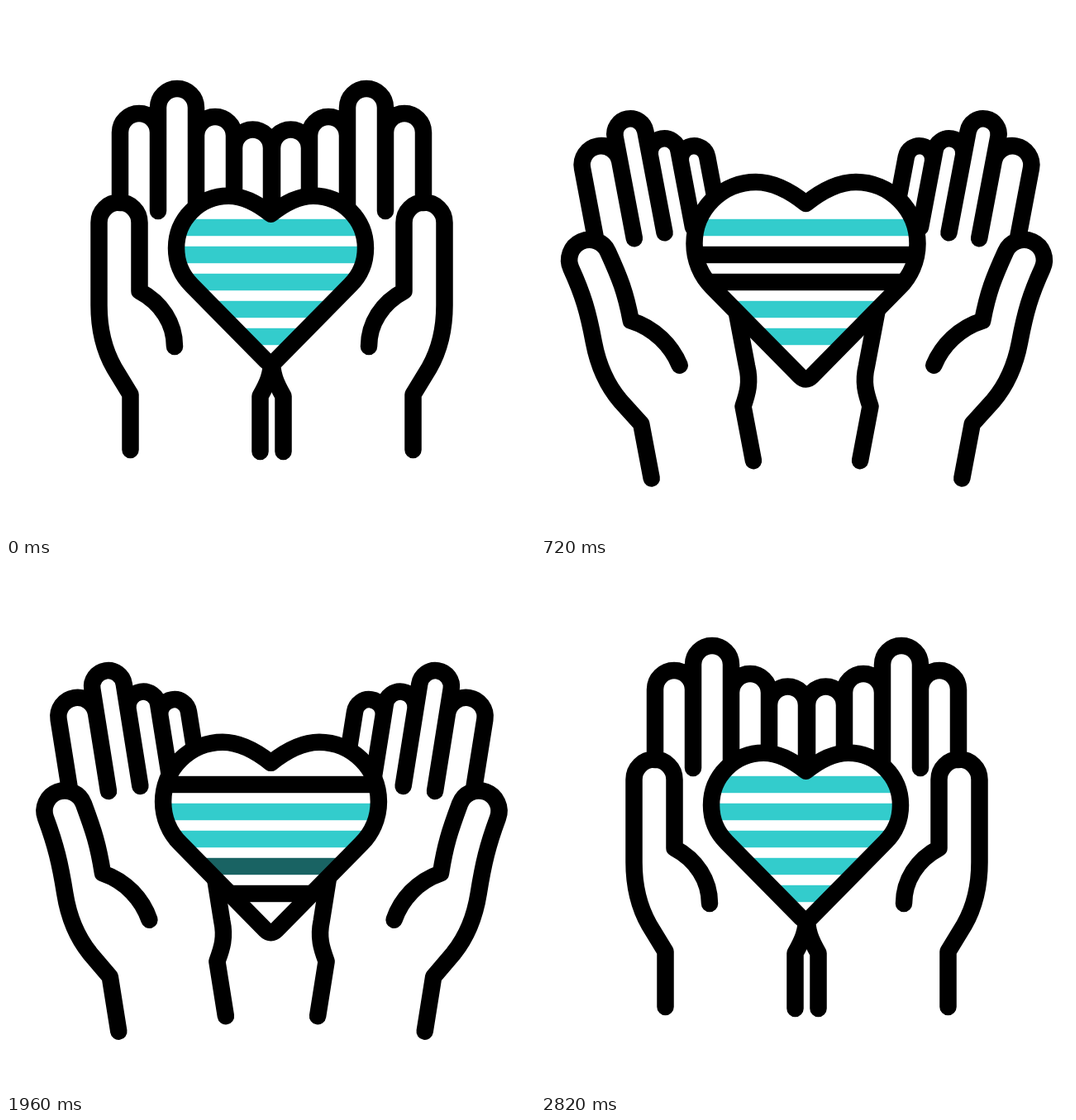
An HTML page with a canvas for the animation above (3600 ms loop, 640 px wide and 640 px high).

```html
<!DOCTYPE html>
<html lang="en">
<head>
<meta charset="utf-8">
<title>Hands and heart</title>
<style>
html, body { margin: 0; width: 100%; height: 100%; overflow: hidden; background: #fff; }
canvas { display: block; width: 640px; height: 640px; }
</style>
</head>
<body>
<canvas id="stage" width="640" height="640"></canvas>
<script>
const LOOP = 3600;
const ctx = document.getElementById('stage').getContext('2d');

// Smooth curve through [time, value] keys, without overshoot, at rest at both ends.
function curve(keys) {
  const step = i => (keys[i + 1][1] - keys[i][1]) / (keys[i + 1][0] - keys[i][0]);
  const slopes = keys.map((_, i) => {
    if (i === 0 || i === keys.length - 1) return 0;
    const a = step(i - 1), b = step(i);
    return a * b > 0 ? 2 * a * b / (a + b) : 0;
  });
  return t => {
    const last = keys.length - 1;
    if (t >= keys[last][0]) return keys[last][1];
    let i = 0;
    while (t >= keys[i + 1][0]) i++;
    const [t0, v0] = keys[i], [t1, v1] = keys[i + 1];
    const d = t1 - t0, u = (t - t0) / d, w = 1 - u;
    return v0 * (1 + 2 * u) * w * w + v1 * u * u * (3 - 2 * u)
      + d * u * w * (slopes[i] * w - slopes[i + 1] * u);
  };
}

const swing = curve([[0, 0], [220, .5], [440, .79], [540, .85], [1020, 1], [1250, 1.01], [1480, .99],
  [1620, .95], [1960, .78], [2160, .62], [2440, .33], [2700, .07], [2820, 0]]);
const fold = curve([[0, 0], [440, .43], [1020, 1], [1250, 1.01], [1480, .98], [1960, .63], [2440, .2], [2820, 0]]);
const beat = curve([[0, 0], [420, 1], [1050, 1], [1580, 0], [1600, 0], [2120, 1], [2380, 1], [2820, 0]]);

// Middle of the fade to black and back, per stripe from the top.
const stripes = [[1150, 2200], [250, 1720], [110, 1250], [1960, 2600], [1350, 2660]];
const FADE = 80;

const mix = (a, b, k) => a + (b - a) * k;
const ramp = (t, mid) => Math.min(1, Math.max(0, (t - mid) / FADE + .5));

function finger(x0, x1, y, bottom0, bottom1) {
  const r = (x1 - x0) / 2;
  ctx.moveTo(x0, bottom0);
  ctx.lineTo(x0, y);
  ctx.arc(x0 + r, y, r, Math.PI, 0);
  ctx.lineTo(x1, bottom1);
}

function thumb(m) {
  const cx = mix(137, 122.5, m), cy = mix(262, 264, m), r = 24.5, tilt = m * Math.PI / 10;
  const sin = Math.sin(tilt), cos = Math.cos(tilt);
  const lx = cx - r * cos, ly = cy + r * sin, rx = cx + r * cos, ry = cy - r * sin;
  ctx.moveTo(150.5, 537);
  ctx.lineTo(150.5, 470);
  ctx.lineTo(131, 438);
  ctx.bezierCurveTo(119, 417, 112.5, 390, 112.5, 362);
  ctx.bezierCurveTo(112.5, 325, lx + 35 * sin, ly + 35 * cos, lx, ly);
  ctx.arc(cx, cy, r, Math.PI - tilt, -tilt);
  ctx.bezierCurveTo(rx + 35 * sin, ry + 35 * cos, 161.5, 310, 161.5, 345);
  ctx.bezierCurveTo(188, 359, 204, 384, mix(204, 211, m), mix(412, 408, m));
}

function hand(a, m) {
  const x2 = 184 + mix(46, 34.7, m);
  const x3 = x2 + mix(46, 31.8, m);
  const x4 = x3 + mix(45, 29, m);
  ctx.save();
  ctx.translate(mix(184, 107, a), mix(248, 284, a));
  ctx.rotate(-11.6 * a * Math.PI / 180);
  ctx.translate(-184, -248);
  ctx.beginPath();
  thumb(m);
  finger(138, 184, 153, 238, 248);
  finger(184, x2, 123, 248, 248);
  finger(x2, x3, mix(157, 152, m), 248, 248);
  finger(x3, x4, mix(172, 166, m), 248, 425);
  ctx.bezierCurveTo(x4 + 1, 445, x4 - 5, 457, x4 - 13.5, 472);
  ctx.lineTo(x4 - 13.5, 539);
  ctx.stroke();
  ctx.restore();
}

function heartPath(scale) {
  const r = 74.5, lobe = 60.5, k = Math.PI / 4;
  ctx.save();
  ctx.translate(320.5, 323.6);
  ctx.scale(scale, scale);
  ctx.beginPath();
  ctx.moveTo(0, -84.6);
  ctx.bezierCurveTo(-18, -99, -38, -110.6, -lobe, -110.6);
  ctx.arc(-lobe, -36.1, r, -Math.PI / 2, 3 * k, true);
  ctx.lineTo(-7, 124.4);
  ctx.quadraticCurveTo(0, 131.4, 7, 124.4);
  ctx.arc(lobe, -36.1, r, k, -Math.PI / 2, true);
  ctx.bezierCurveTo(38, -110.6, 18, -99, 0, -84.6);
  ctx.closePath();
  ctx.restore();
}

function heart(t) {
  heartPath(mix(.848, 1, beat(t)));
  ctx.fillStyle = '#fff';
  ctx.fill();
  ctx.save();
  ctx.clip();
  stripes.forEach(([on, off], i) => {
    const light = 1 - ramp(t, on) + ramp(t, off);
    ctx.fillStyle = `rgb(${51 * light}, ${204 * light}, ${204 * light})`;
    ctx.fillRect(160, 257.8 + 33 * i, 320, 20.4);
  });
  ctx.restore();
  ctx.stroke();
}

function draw(t) {
  ctx.fillStyle = '#fff';
  ctx.fillRect(0, 0, 640, 640);
  ctx.strokeStyle = '#000';
  ctx.lineWidth = 20.5;
  ctx.lineCap = ctx.lineJoin = 'round';
  const a = swing(t), m = fold(t);
  hand(a, m);
  ctx.save();
  ctx.translate(643, 0);
  ctx.scale(-1, 1);
  hand(a, m);
  ctx.restore();
  heart(t);
}

const start = performance.now();
function tick() {
  draw((performance.now() - start) % LOOP);
  requestAnimationFrame(tick);
}
tick();
</script>
</body>
</html>
```
